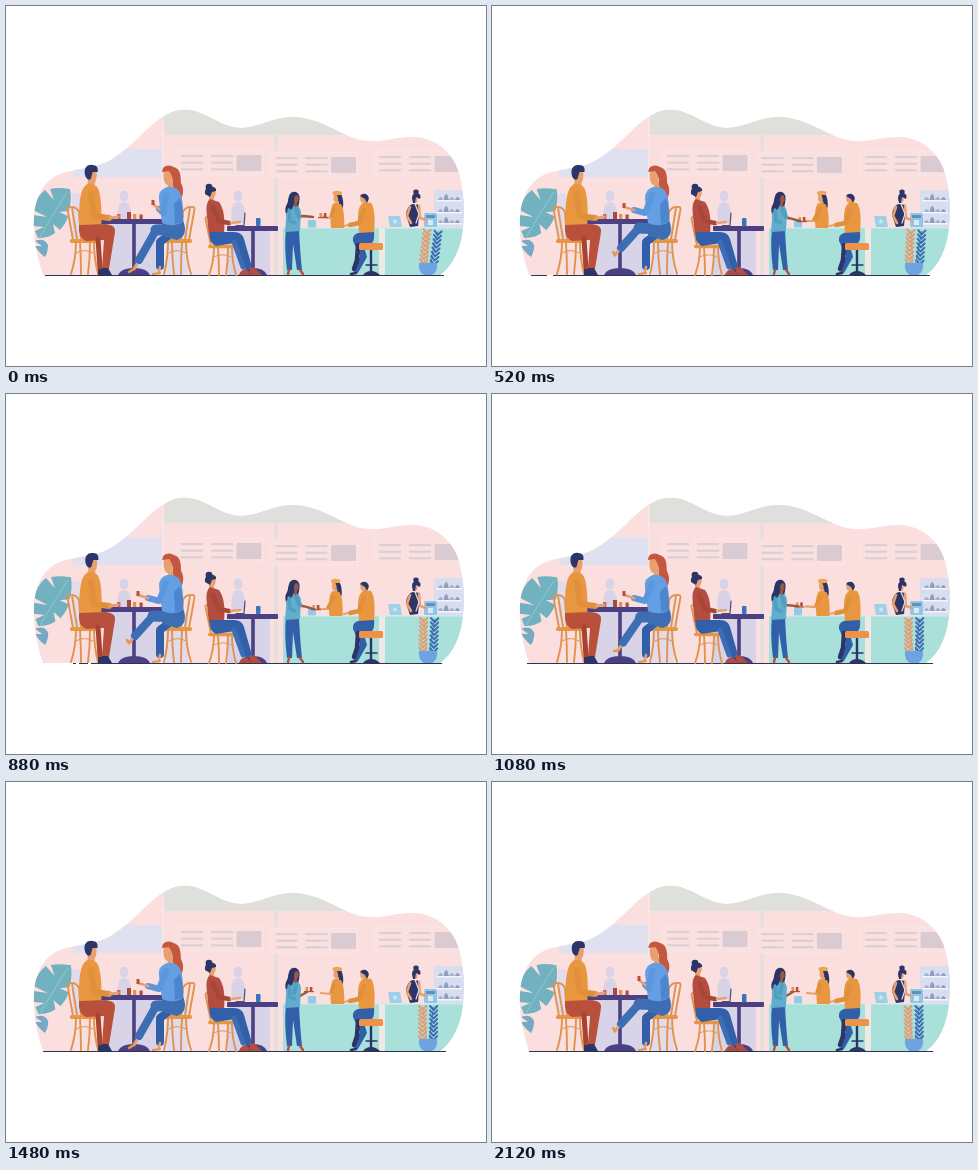
Animation of 480x360 px, one loop 2.16 s. Source, as an HTML page:

```html
<!DOCTYPE html>
<html lang="en">
<head>
<meta charset="utf-8">
<title>Cafe</title>
<style>
html, body { margin: 0; width: 100%; height: 100%; overflow: hidden; background: #fff; }
svg { display: block; width: 480px; height: 360px; }
</style>
</head>
<body>
<svg id="stage" viewBox="0 0 480 360" xmlns="http://www.w3.org/2000/svg"></svg>
<script>
const LOOP = 2160, STEP = 40;
const C = {
  wall: '#fbdfde', band: '#dfe0db', mist: '#d9d3e8', sign: '#dfe1f1', board: '#ddced5',
  navy: '#2b3567', plum: '#4a4083', orange: '#e8963f', wood: '#e0934f', skin: '#e8a06f',
  brick: '#b9503c', red: '#b34d3f', hair: '#c4573f', sky: '#659fe3', denim: '#3d6db3',
  blue: '#315fa9', teal: '#a9e0da', aqua: '#62adcb', brown: '#965948', leaf: '#72b1bf'
};

const rect = (x, y, w, h, fill, r = 0) =>
  `<rect x="${x}" y="${y}" width="${w}" height="${h}" rx="${r}" fill="${fill}"/>`;
const oval = (x, y, rx, ry, fill) =>
  `<ellipse cx="${x}" cy="${y}" rx="${rx}" ry="${ry}" fill="${fill}"/>`;
const shape = (d, fill) => `<path d="${d}" fill="${fill}"/>`;
const line = (d, color, w) =>
  `<path d="${d}" fill="none" stroke="${color}" stroke-width="${w}" stroke-linecap="round" stroke-linejoin="round"/>`;
const limb = (id, color, w) =>
  `<path id="${id}" fill="none" stroke="${color}" stroke-width="${w}" stroke-linecap="round" stroke-linejoin="round"/>`;
const group = (id, body) => `<g id="${id}">${body}</g>`;
const at = (transform, body) => `<g transform="${transform}">${body}</g>`;
const inRoom = body => `<g clip-path="url(#room)">${body}</g>`;
const range = n => [...Array(n).keys()];

const blob = `M37 269C30 248 27 230 28 212C29 188 41 170 60 166C76 162 88 162 101 156
  C126 143 143 117 160 109C170 103 182 102 194 107C208 112 218 121 234 122C253 122 266 111 286 111
  C314 111 333 129 355 134C376 138 389 130 408 131C432 132 449 149 454 171C459 192 459 214 455 234
  C451 250 444 262 434 269Z`;

function menu(x, y) {
  const bars = [0, 30].map(dx =>
    range(3).map(i => rect(x + 5 + dx, y + 5 + i * 6.6, 22, 2.2, C.board)).join('')).join('');
  return `<rect x="${x}" y="${y}" width="87" height="25" fill="#fae1df" stroke="#f7ebe7" stroke-dasharray="2 2"/>`
    + bars + rect(x + 60.5, y + 5, 25, 16, '#dacbd2', 1);
}

const ghost = (x, y) => at(`translate(${x} ${y})`,
  oval(0, 0, 4.5, 5.5, C.mist) + shape('M-6 27C-8 11-5 6 0 6C5 6 8 11 7 27Z', C.mist));

const cakes = y => rect(430, y, 26, 1.5, '#f4f6fc')
  + range(4).map(i => {
    const x = 432 + i * 5.6, h = 3 + (i % 3 === 1 ? 3 : 0);
    return shape(`M${x} ${y}Q${x + 1} ${y - h} ${x + 2.6} ${y - h}T${x + 5.2} ${y}Z`, i % 2 ? '#8f9fbd' : '#a3b1cc');
  }).join('');

const chair = line('M67 234L62 206Q60 200 65 201Q71 201 73 206L75 234M66 202L71 233', C.wood, 1.9)
  + rect(64, 233, 28, 4, C.orange, 1.8)
  + line('M70 236Q70 252 65 268M74 236Q75 252 75 268M84 236Q84 252 82 268M88 236Q88 252 92 268', C.wood, 1.9)
  + line('M70 247Q79 242 87 247', C.wood, 1);

function table(x1, x2, y, post, rx) {
  return rect(post - 1.8, y + 4, 3.6, 262 - y, C.plum)
    + shape(`M${post - rx} 269Q${post - rx + 3} 262 ${post} 262T${post + rx} 269Z`, C.plum)
    + rect(x1, y, x2 - x1, 5, C.plum, .8);
}

function wall() {
  return shape(blob, C.wall) + inRoom(
    rect(158, 95, 202, 34, C.band)
    + rect(67, 143, 90, 28, C.sign)
    + rect(156, 110, 1.6, 159, '#f8e7e4') + rect(268.5, 129, 3, 140, '#e2dfdf')
    + menu(170, 144) + menu(264.5, 146) + menu(368, 145)
    + rect(66, 187, 8, 45, '#e2dbeb') + rect(102, 218, 52, 51, C.mist)
    + rect(160, 220, 22, 49, '#e3daea') + rect(222, 224, 42, 45, C.mist)
    + ghost(118, 190) + ghost(232, 190)
    + rect(428, 184, 32, 38, '#d8def0') + cakes(194) + cakes(206) + cakes(217)
    + rect(277, 222, 97, 47, C.teal) + rect(373, 222, 6, 47, '#eee9e5')
    + rect(379, 222, 80, 47, C.teal) + rect(277, 221.5, 180, 1, '#d2efea'));
}

const leaves = () => inRoom(group('fern',
  shape('M64 183Q52 181 44 183L48 194L39 184Q30 191 27 204L41 211L27 209V220L38 221L29 225L32 232Q43 232 49 227L47 218L54 224Q61 216 62 210L53 206L63 205Q66 193 64 183Z', C.leaf)
  + line('M61 186Q48 206 34 231', '#9accd5', .8)
  + shape('M29 235Q38 231 42 239Q42 246 39 251Q33 247 29 240L36 240Z', '#76a9c3')));

const man = () => group('manBody',
    rect(82, 172, 7, 10, C.skin, 2)
    + shape('M84 162Q91 161 91 168Q91 177 87 178Q82 177 82 170Z', C.skin)
    + shape('M80 171C77 163 81 158 87 159Q93 159 92 166L87 166L85 173Q82 175 80 171Z', C.navy)
    + shape('M82 178C74 182 73 195 73 222L95 223C96 210 96 190 92 182Q88 177 82 178Z', C.orange))
  + shape('M73 219L100 218Q110 219 109 226L103 263H96L98 234L80 235Q72 232 73 219Z', C.brick)
  + line('M92 233L94 262', '#a8432f', 5)
  + shape('M96 262H102L106 269H96ZM92 263H97L99 269H92Z', C.navy)
  + line('M85 188L88 210L103 212', '#e08f3a', 6) + line('M104 212L112 211', C.skin, 2.8);

const woman = () => line('M168 225L154 236L154 260', C.blue, 8)
  + line('M154 261L153 266', C.skin, 2.5) + line('M154 267L147 268', C.orange, 2.2)
  + shape('M156 214H177Q183 230 171 234L156 230Z', C.denim)
  + limb('thigh', C.denim, 11) + limb('shin', C.denim, 8)
  + limb('ankle', C.skin, 3) + limb('shoe', C.orange, 2.4)
  + group('womanBody',
    shape('M166 161C175 161 175 171 175 177C179 184 177 191 173 196Q167 190 167 176Z', C.hair)
    + rect(162, 174, 5, 10, C.skin, 2)
    + shape('M158 164Q166 161 167 170Q165 179 161 179Q156 175 158 164Z', C.skin)
    + shape('M156 166Q157 158 166 160Q172 163 170 176L167 181Q168 171 163 165Z', C.hair)
    + shape('M161 181Q152 184 153 193L156 217Q168 222 177 216Q178 192 173 185Q168 180 161 181Z', C.sky)
    + shape('M168 198L174 192Q178 204 177 216L169 218Z', '#4c86cf'))
  + limb('sleeve', '#5c96dc', 6) + limb('hand', C.skin, 2.8)
  + group('drink', rect(-1.5, -4, 3, 5, C.brick, .6));

const reader = () => oval(203, 181, 3.4, 3.2, C.navy)
  + rect(203, 188, 5, 8, C.skin, 2) + oval(206.5, 187, 3.2, 5, C.skin)
  + shape('M199 188Q198 181 205 180.5Q211 181 210 185L206 186L204 191Z', C.navy)
  + shape('M204 193Q199 196 201 211L203 229L218 228Q220 205 213 196Z', C.red)
  + shape('M204 226L228 226Q236 226 238 233L246 261L240 264L229 237L210 240Q202 236 204 226Z', C.blue)
  + line('M228 236L237 261', C.denim, 5)
  + shape('M233 269Q236 262 242 264L245 269ZM243 262L248 261L256 269H245Z', C.red)
  + line('M207 201L213 215L223 217', '#a8463a', 4.6) + line('M225 217L234 216', C.skin, 2.4)
  + line('M230 219.5L238 219.5L239 207', '#4f4a80', 1.2);

const guest = () => limb('guestArm', C.brown, 2.4)
  + shape('M283 190Q285 185 290 186Q295 188 293 197L291 207L280 208Q278 201 282 197Z', C.navy)
  + shape('M280 223H293Q294 246 296 264H291L287 238L286 264H281Q278 240 280 223Z', C.blue)
  + line('M283 264L282 268M294 264L297 268', C.brick, 2.4)
  + shape('M285 199Q279 202 280 213L279 226L294 225L295 206Q294 199 288 199Z', C.aqua)
  + oval(290, 193, 2.6, 4, C.brown) + rect(288, 196, 3, 5, C.brown, 1)
  + shape('M282 195Q283 186 291 187L288 192Q289 198 286 203L280 207Q280 200 282 195Z', C.navy)
  + limb('guestSleeve', '#509fc0', 4.2)
  + line('M283 204L284 215L289 217', '#509fc0', 3.4);

const server = () => group('serverBody',
    shape('M329 188Q335 186 336 193L337 202L331 201Z', C.navy)
    + oval(330, 192, 2.5, 4.2, C.skin) + rect(329.5, 195, 3.5, 4, C.skin)
    + shape('M331 189Q333 195 335 202L337 201Q338 194 335 188Z', C.navy)
    + shape('M327 189L326.5 186Q331 183.5 336 186L335.5 189Z', '#eda652')
    + shape('M328 197Q323 201 325 222L338 222Q339 204 335 198Z', C.orange))
  + limb('serverSleeve', '#e08f3a', 3.8) + limb('serverHand', C.skin, 2.2)
  + group('tray', rect(-5, 0, 10, 1.2, C.brick) + rect(-3.5, -4, 2.6, 4, C.wood) + rect(.8, -4, 2.6, 4, C.red));

const patron = () => line('M365 243L365 267', C.navy, 2.4) + line('M360 259H371', C.navy, 1.4)
  + shape('M357 269Q360 265 365 265T374 269Z', C.navy)
  + rect(357, 191, 4, 7, C.skin) + oval(357, 192.5, 2.8, 4.2, C.skin)
  + shape('M354 190Q356 187 360 188Q365 191 361 197L359 193Z', C.navy)
  + shape('M359 196Q352 198 352 211L353 228L368 228Q370 203 365 197Z', C.orange)
  + shape('M368 226L352 227Q346 229 347 235L354 250L347 265L352 267L361 251L357 237L365 238Q369 235 368 226Z', C.blue)
  + line('M352 239L351 254L348 263', C.navy, 4.5)
  + line('M350 267L345 268', C.navy, 2.6)
  + rect(353, 237, 24, 7, '#ef9147', 1.5)
  + line('M358 204L353 217L344 219', '#e08f3a', 4.5) + line('M342 219L338 220', C.skin, 2.2);

const barista = () => oval(410, 186, 2.7, 2.4, C.navy) + oval(409, 193, 2.6, 4, C.skin)
  + shape('M406 192Q406 187 411 187Q416 188 414 193L410 191L409 197L407 197Z', C.navy)
  + shape('M407 198Q401 199 400 209L404 221L412 220L414 199Z', C.navy)
  + line('M404 201L401 210L405 217', C.skin, 2.6)
  + line('M413 200L414 212L420 214', C.skin, 2.6) + line('M409 198L413 208L410 217', '#e7ddea', 1.2);

// A stem with pairs of slanted leaflets.
function stalk(x, color, far) {
  const pairs = range(8).map(i => {
    const y = 224 + i * 4.3;
    return `M${x} ${y + 4}L${x - 3.6} ${y}M${x} ${y + 4}L${x + 3.6} ${y}`;
  }).join('');
  return line(pairs, color, 2) + line(`M${x} 225L${far} 260`, color, .8);
}

const still = {
  machine: rect(418, 207, 13, 14, '#91c6e8', 1.5) + rect(420, 209, 9, 3, '#5e91bd')
    + rect(422, 214, 5, 5, '#d7ebf7') + shape('M382 210H394L396 221H384Z', '#a0d0e8')
    + oval(389, 215.5, 2, 2, '#c8e6f4') + rect(302, 214, 8, 7.5, '#92cbe6', 1),
  glasses: rect(111, 208, 3.4, 5, '#cc6950') + rect(121, 206, 4, 7, '#a9483f')
    + rect(127, 208, 3.3, 5, C.wood) + rect(133.5, 208.5, 3.2, 4.5, C.red),
  mug: rect(250, 212, 4.5, 8, '#3774bd', 1)
};

const svg = document.getElementById('stage');
svg.innerHTML = `<defs><clipPath id="room"><path d="${blob}"/></clipPath></defs>`
  + wall() + leaves()
  + `<path id="floor" fill="none" stroke="#2f3156" stroke-width="1.1" transform="translate(0 .5)"/>`
  + still.machine + barista() + server() + guest() + patron()
  + at('translate(138 36) scale(1 .87)', chair) + table(221, 272, 220, 247, 14) + reader() + still.mug
  + chair + at('translate(250 0) scale(-1 1)', chair)
  + table(92, 158, 213, 128, 16) + still.glasses + man() + woman()
  + group('plant', stalk(416.5, '#e59a70', 421) + stalk(427.5, C.denim, 423))
  + shape('M413 257H431Q432 266 426 269H418Q412 266 413 257Z', '#6da3e1');

const part = Object.fromEntries([...svg.querySelectorAll('[id]')].map(e => [e.id, e]));
const draw = (id, d) => part[id].setAttribute('d', d);
const move = (id, t) => part[id].setAttribute('transform', t);
const mix = (a, b, k) => a + (b - a) * k;
const between = (a, b, k) => a.map((n, i) => mix(n, b[i], k));
const path = (...pts) => 'M' + pts.map(p => p.join(' ')).join('L');

// Eased value between [time, value] stops.
function ease(stops, t) {
  const i = stops.findIndex(s => s[0] > t);
  if (i < 0) return stops[stops.length - 1][1];
  if (!i) return stops[0][1];
  const [a, u] = stops[i - 1], [b, v] = stops[i], k = (t - a) / (b - a);
  return mix(u, v, k * k * (3 - 2 * k));
}

const track = {
  leg: [[0, 0], [140, 0], [480, 1], [920, 1], [1220, 0], [1500, 0], [1800, 1], [2160, 1]],
  sip: [[0, 1], [100, 1], [460, 0], [1500, 0], [1800, 1], [2160, 1]],
  lean: [[0, -.3], [520, .5], [880, .3], [1240, -1.2], [1480, -.5], [1840, 1], [2160, .8]],
  reach: [[0, 1], [420, 1.2], [900, 1.2], [1200, .8], [1440, 0], [2160, 0]],
  offer: [[0, 0], [480, 1], [900, 1], [1200, 0], [2160, 0]],
  trayX: [[0, 317], [480, 310], [900, 310], [1200, 306], [1440, 303], [2160, 303]],
  trayY: [[0, 211], [480, 215], [900, 215], [1200, 211], [1440, 209], [2160, 209]],
  fern: [[0, 0], [520, .5], [1240, 1], [1840, 0], [2160, .3]],
  plant: [[0, 7], [520, 3.5], [880, 1.8], [1240, -.8], [1480, .2], [2160, -.8]]
};

const floors = [
  [0, 'M39 269H438'], [440, 'M39 269H55M61 269H438'],
  [720, 'M67 269H70M73 269H82M85 269H436'], [1080, 'M35 269H441'],
  [1360, 'M37 269H440'], [1680, 'M64 269H438'], [2000, 'M37 269H441']
];

function render(t) {
  const v = Object.fromEntries(Object.entries(track).map(([k, s]) => [k, ease(s, t)]));
  draw('floor', floors.filter(f => f[0] <= t).pop()[1]);

  const knee = between([150, 224], [147, 222], v.leg);
  const foot = between([133, 254], [129, 242], v.leg);
  const toe = between([128, 263], [123, 249], v.leg);
  draw('thigh', path([171, 223], knee));
  draw('shin', path(knee, foot));
  draw('ankle', path(between(foot, toe, .5), toe));
  draw('shoe', path(toe, between([123, 266], [121, 246], v.leg)));

  const hand = between([132, 201], [147, 198], v.sip);
  const cuff = between([142, 204], [153, 203], v.sip);
  draw('sleeve', path([160, 189], [mix(153, 157, v.sip), 207], cuff));
  draw('hand', path(cuff, hand));
  move('drink', `translate(${hand[0]} ${hand[1]})`);
  move('manBody', `rotate(${v.lean} 84 222)`);
  move('womanBody', `rotate(${v.lean * .4} 168 218)`);

  const palm = [mix(301, 307, v.reach), mix(210, 211, v.reach) + v.offer * 4];
  const wrist = [mix(294, 297, v.reach), mix(214, 210, v.reach) + v.offer * 3];
  draw('guestSleeve', path([290, 203], [mix(288, 293, v.reach), 211]));
  draw('guestArm', path([290, 211], wrist, palm));

  draw('serverSleeve', path([328, 203], between([325, 211], [322, 214], v.offer)));
  draw('serverHand', path(between([325, 212], [321, 215], v.offer), between([315, 211], [312, 215], v.offer)));
  move('serverBody', `translate(${-v.offer * 1.5} 0)`);
  move('tray', `translate(${v.trayX} ${v.trayY})`);
  move('fern', `rotate(${v.fern} 38 260)`);
  move('plant', `rotate(${v.plant} 422 262)`);
}

const start = performance.now();
function tick() {
  const t = (performance.now() - start) % LOOP;
  render(Math.floor(t / STEP) * STEP);
  requestAnimationFrame(tick);
}
render(0);
requestAnimationFrame(tick);
</script>
</body>
</html>
```
